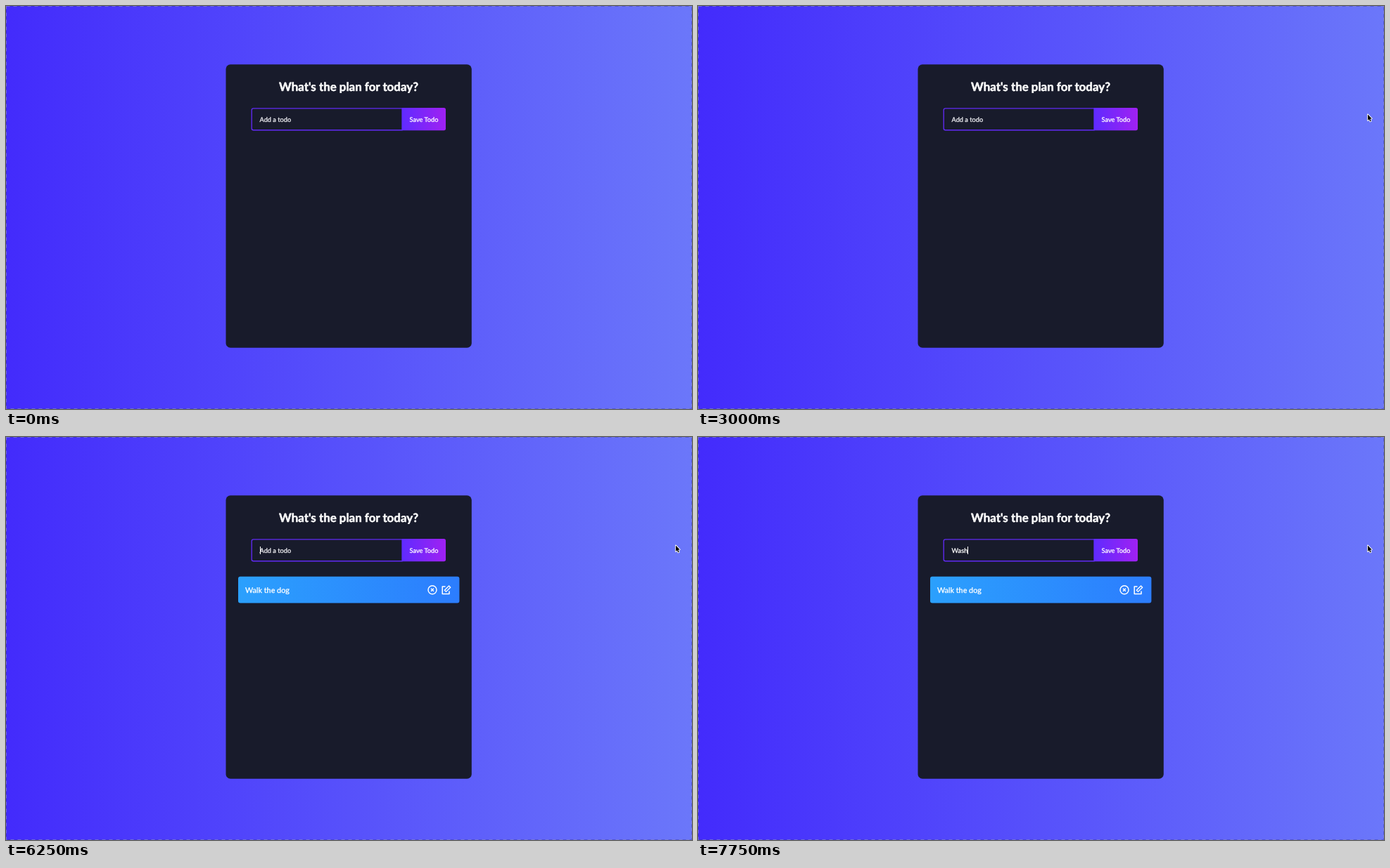
Animation of 975x574 px, one loop 8000 ms. Source, as an HTML page with a canvas:

```html
<!DOCTYPE html>
<html lang="en">
<head>
<meta charset="utf-8">
<title>Todo list</title>
<style>
  html, body { margin: 0; width: 100%; height: 100%; overflow: hidden; background: #4f42fb; }
  canvas { display: block; width: 975px; height: 574px; }
</style>
</head>
<body>
<canvas id="stage" width="975" height="574"></canvas>
<script>
const W = 975, H = 574, LOOP = 8000, STEP = 250, BLINK = 500;
const TODO = 'Walk the dog', NEXT_TODO = 'Wash';

// Moments of the story, in ms.
const ENTER = 500, FOCUS = 1500, TYPE = 3500, RESUME = 6000, SAVE = 6250, RETYPE = 7250;
const LAST_KEY = 4500;

const ctx = document.getElementById('stage').getContext('2d');
ctx.textRendering = 'geometricPrecision';
ctx.lineJoin = 'round';

const lato = (size, weight = 400) => `${weight} ${size}px Lato, sans-serif`;
const steps = ms => Math.floor(ms / STEP);

function typedText(t) {
  if (t < TYPE) return '';
  if (t < RESUME) return TODO.slice(0, 1 + 2 * steps(Math.min(t, LAST_KEY) - TYPE));
  if (t < SAVE) return TODO.slice(0, -1);
  return t < RETYPE ? '' : NEXT_TODO.slice(0, 2 + steps(t - RETYPE));
}

// Every key press lights the caret again and restarts its blinking.
function caretVisible(t) {
  if (t < FOCUS) return false;
  const reset = [FOCUS, TYPE, LAST_KEY, RESUME, SAVE, RETYPE].findLast(key => key <= t);
  const typing = reset === TYPE || reset === RETYPE;
  return typing || Math.floor((t - reset) / BLINK) % 2 === 0;
}

// The pointer dives to the field, rests there, then leaves to the right.
function pointerAt(t) {
  if (t < ENTER) return null;
  if (t >= 2000) return [951, 153];
  if (t >= 1750) return [811, 138];
  const dive = [[785, 101], [748, 122.5], [507, 151.5], [423, 171]];
  return dive[Math.min(steps(t - ENTER), dive.length - 1)];
}

function ramp(x0, x1, from, to) {
  const g = ctx.createLinearGradient(x0, 0, x1, 0);
  g.addColorStop(0, from);
  g.addColorStop(1, to);
  return g;
}

function box(x, y, w, h, radius, fill) {
  ctx.beginPath();
  ctx.roundRect(x, y, w, h, radius);
  ctx.fillStyle = fill;
  ctx.fill();
}

// A hairline stroke gives the letters their slightly heavy look.
function label(text, x, y, font, { color = '#fff', align = 'left', bolder = 0.3 } = {}) {
  ctx.font = font;
  ctx.textAlign = align;
  ctx.fillStyle = ctx.strokeStyle = color;
  ctx.lineWidth = bolder;
  ctx.fillText(text, x, y);
  if (bolder) ctx.strokeText(text, x, y);
}

function path(points, closed) {
  ctx.beginPath();
  points.forEach(([x, y]) => ctx.lineTo(x, y));
  if (closed) ctx.closePath();
}

function stroke(color, width) {
  ctx.strokeStyle = color;
  ctx.lineWidth = width;
  ctx.stroke();
}

function at(x, y, angle, paint) {
  ctx.save();
  ctx.translate(x, y);
  ctx.rotate(angle);
  paint();
  ctx.restore();
}

function drawBackground() {
  ctx.fillStyle = ramp(0, W, '#432bfc', '#6b77fa');
  ctx.fillRect(0, 0, W, H);
  ctx.beginPath();
  ctx.rect(0.5, 0.5, W - 1, H - 1);
  stroke('rgba(50, 45, 150, 0.4)', 1);
  ctx.setLineDash([5, 5]);
  stroke('rgba(155, 160, 225, 0.5)', 1);
  ctx.setLineDash([]);
}

function drawForm(text, caretOn) {
  const centered = { align: 'center' };
  label("What's the plan for today?", 487, 120.5, lato(16.9, 700), { align: 'center', bolder: 0.5 });

  ctx.beginPath();
  ctx.roundRect(349.2, 145.8, 214, 30.9, [2.5, 0, 0, 2.5]);
  stroke('#602af4', 1.35);
  box(562.7, 145.1, 62.3, 32.2, [0, 2.7, 2.7, 0], ramp(563, 625, '#602bff', '#a021f2'));
  label('Save Todo', 594, 164.6, lato(9.2), centered);

  label(text || 'Add a todo', 360.6, 164.6, lato(9.2), { color: text ? '#fff' : '#eeeef2' });
  if (caretOn) {
    const x = 361 + Math.floor(text ? ctx.measureText(text).width - 0.5 : 0);
    ctx.fillStyle = '#fff';
    ctx.fillRect(x, 156, 1, 11);
  }
}

function drawItem() {
  box(330, 198.8, 314.4, 37.6, 3, ramp(330, 644, '#2ba0fd', '#2c7dfe'));
  label(TODO, 340, 221.6, lato(10.8));

  at(606, 217.8, Math.PI / 4, () => {
    ctx.beginPath();
    ctx.arc(0, 0, 6, 0, Math.PI * 2);
    for (const [dx, dy] of [[2.8, 0], [0, 2.8]]) {
      ctx.moveTo(-dx, -dy);
      ctx.lineTo(dx, dy);
    }
    stroke('#fff', 1.45);
  });

  path([[624.5, 213], [620.2, 213], [620.2, 223.4], [630, 223.4], [630, 219.5]]);
  stroke('#fff', 1.5);
  at(627.5, 216.2, -Math.PI / 4, () => {
    ctx.beginPath();
    ctx.rect(-4.4, -1.5, 8.8, 3);
    stroke('#fff', 1.35);
  });
}

function drawPopup() {
  ctx.save();
  ctx.shadowColor = 'rgba(0, 0, 0, 0.35)';
  ctx.shadowBlur = 3;
  ctx.shadowOffsetY = 1;
  box(415.2, 183.3, 80.7, 29.8, 2.5, '#fff');
  ctx.restore();
  path([[423.6, 184], [429.8, 178], [436, 184]], true);
  ctx.fill();
  label(TODO, 423.3, 201.6, '400 8.6px Inter, sans-serif', { color: '#222', bolder: 0 });
}

function drawPointer([x, y]) {
  at(x, y, 0, () => {
    path([[0.9, 1.4], [0.9, 10], [2.9, 8.2], [4.2, 11.4], [5.6, 10.8], [4.3, 7.7], [6.7, 7.4]], true);
    stroke('#fff', 1.8);
    ctx.fillStyle = '#000';
    ctx.fill();
  });
}

function draw(t) {
  drawBackground();
  box(312.5, 83.3, 349.3, 403.4, 6.5, '#181b2b');
  drawForm(typedText(t), caretVisible(t));
  if (t >= SAVE) drawItem();
  if (t >= RETYPE && t < RETYPE + STEP) drawPopup();
  const pointer = pointerAt(t);
  if (pointer) drawPointer(pointer);
}

const start = performance.now();
function tick() {
  draw((performance.now() - start) % LOOP);
  requestAnimationFrame(tick);
}
tick();
</script>
</body>
</html>
```
